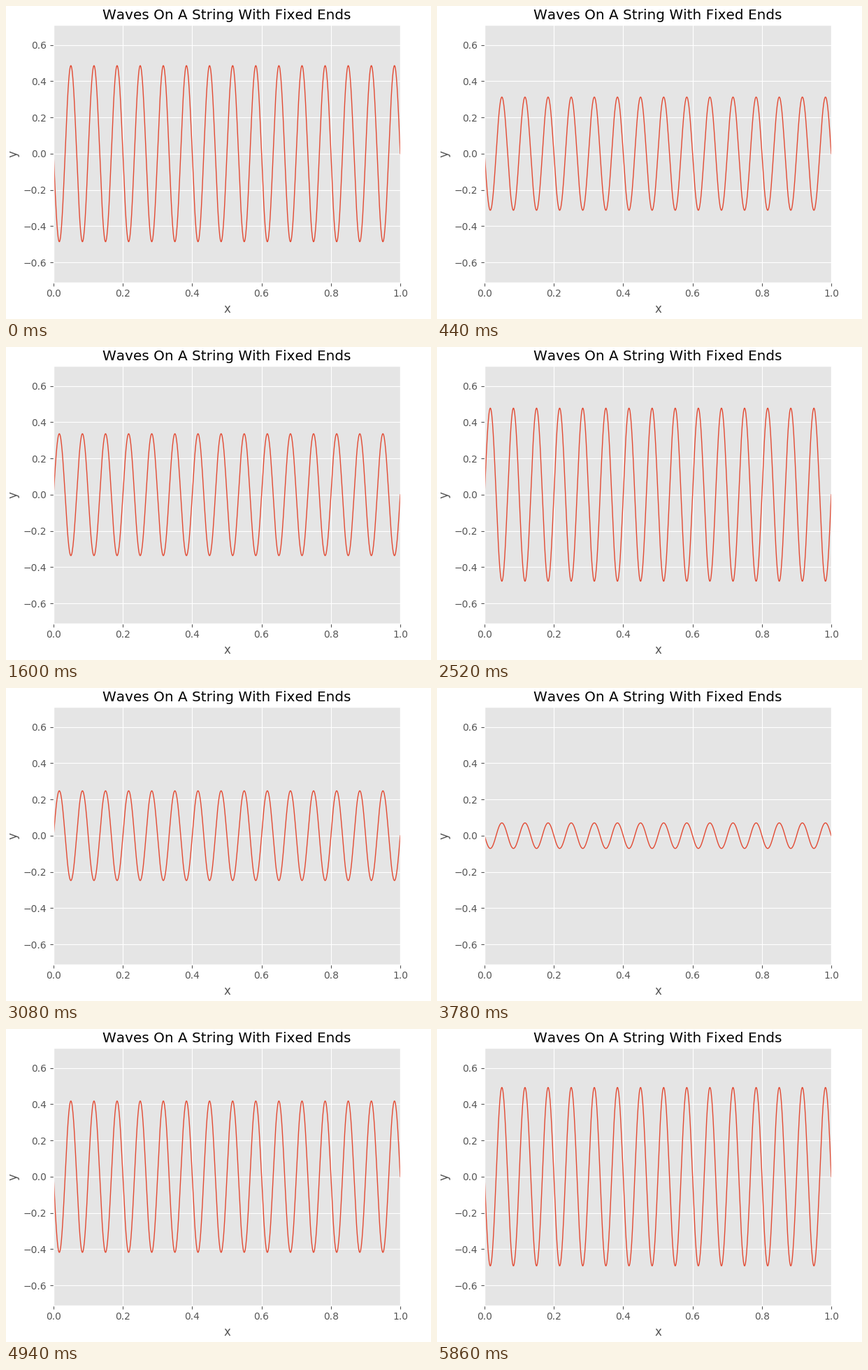
Animation of 608 by 447 pixels, one loop 6030 ms. Source, as a matplotlib script:

```python
import matplotlib.pyplot as plt
import numpy as np
from matplotlib.animation import FuncAnimation

WIDTH, HEIGHT, DPI = 608, 447, 100
LOOP_MS, TICK_MS = 6030, 30
LEFT, RIGHT, TOP, BOTTOM = 68, 564, 27.2, 394.6

WAVES = 15             # wavelengths along the string
CYCLES_PER_STEP = 0.015
START_STEP = 2.5

# Playback runs steadily between these points, slower towards the end
KEY_MS = [0, 670, 1600, 3160, 3780, 5860]
KEY_STEPS = [0, 11, 22, 43, 49, 66]

plt.style.use("ggplot")
plt.rcParams["font.family"] = "DejaVu Sans"
plt.rcParams["text.kerning_factor"] = 6

# The small margin keeps the pixel size from rounding down
fig = plt.figure(figsize=((WIDTH + 0.01) / DPI, (HEIGHT + 0.01) / DPI), dpi=DPI,
                 facecolor="white")
ax = fig.add_axes([LEFT / WIDTH, 1 - BOTTOM / HEIGHT,
                   (RIGHT - LEFT) / WIDTH, (BOTTOM - TOP) / HEIGHT])
ax.set(xlim=(0, 1), ylim=(-0.71, 0.71), xlabel="x", ylabel="y")
ax.set_title("Waves On A String With Fixed Ends")

x = np.linspace(0, 1, 1000)
shape = 0.5 * np.sin(2 * np.pi * WAVES * x)
string, = ax.plot(x, shape, color="#E24A33", lw=1)


def update(frame):
    # Sample at the end of the tick so a change is never shown late
    now = (frame + 1) * TICK_MS - 1
    step = np.floor(np.interp(now, KEY_MS, KEY_STEPS))
    phase = 2 * np.pi * CYCLES_PER_STEP * (step + START_STEP)
    string.set_ydata(-np.cos(phase) * shape)
    return string,


anim = FuncAnimation(fig, update, frames=LOOP_MS // TICK_MS,
                     interval=TICK_MS, repeat=True, repeat_delay=0)
plt.show()
```
